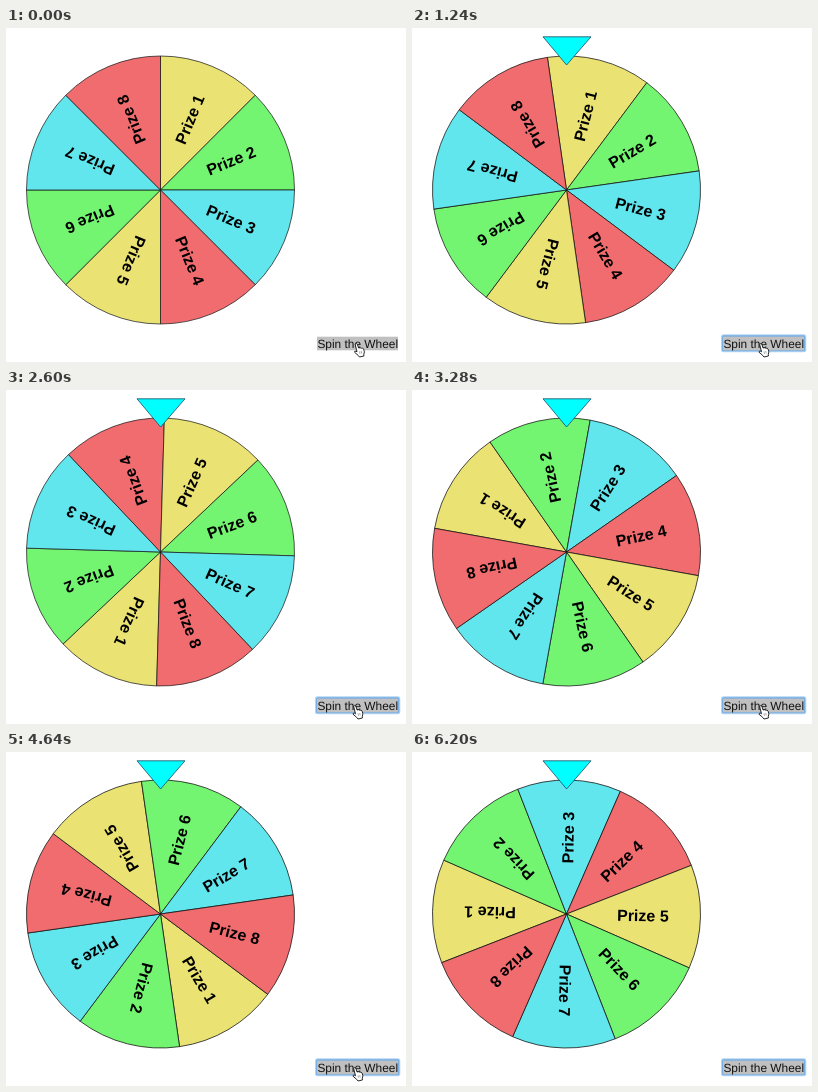
Write an HTML page that moves like this. It is 400 px wide and 334 px high and loops after 6.32 s.

```html
<!DOCTYPE html>
<html lang="en">
<head>
<meta charset="utf-8">
<title>Prize wheel</title>
<style>
  html, body { margin: 0; width: 100%; height: 100%; overflow: hidden; background: #fff; }
  svg { display: block; width: 400px; height: 334px; }
  text { font-family: "Liberation Sans", Arial, sans-serif; text-rendering: geometricPrecision; }
  #wheel path { stroke: #111; stroke-width: .7; }
  #wheel text { font-size: 16px; font-weight: bold; text-anchor: middle; }
  #label { font-size: 11.9px; fill: #111; }
</style>
</head>
<body>
<svg viewBox="0 0 400 334">
  <g id="wheel"></g>
  <path id="pointer" d="M131 8.8H179L154.6 37Z" fill="#00ffff" stroke="#1a4a66" stroke-width=".8"/>
  <g id="ring">
    <rect x="309" y="306.3" width="85.3" height="18" rx="2.5" fill="#b4d5f5"/>
    <rect x="310" y="307.3" width="83.3" height="16" rx="1.5" fill="#78b0e4"/>
  </g>
  <rect x="311" y="308.7" width="81" height="13.6" fill="#c0c0c0"/>
  <text id="label" x="311.4" y="320">Spin the Wheel</text>
  <g id="cursor">
    <path d="M347.6 316.2q1.2-1.3 2.3.2l1.2 3.6 1.5-.3 1.2.5 1.3-.1 1 1 .8 2.8-.6 2.3.1 1.8-4.4 1-1.4-1.7-3.6-3.1q-.1-1.4 1.5-1l1 .6Z"
      fill="#fff" stroke="#111" stroke-width=".9" stroke-linejoin="round"/>
    <path d="M352 323.4l.5 2.4M353.7 323l.5 2.4" stroke="#555" stroke-width=".5"/>
  </g>
</svg>
<script>
  const LOOP = 6320, STEP = 40;
  const SPIN = { start: 638.8, length: 5000, total: 8 * 360 + 248.7, power: 2.015 };
  const PRESS = 400, LEAVE = 6000;
  const CX = 154.5, CY = 162, R = 134, TEXT_R = 76.4;
  const colors = ["#eae272", "#74f572", "#62e6ee", "#f16c6f"];
  const el = id => document.getElementById(id);
  const wheel = el("wheel");

  const rim = deg => {
    const a = (deg - 90) * Math.PI / 180;
    return `${R * Math.cos(a)} ${R * Math.sin(a)}`;
  };

  const slices = [], labels = [];
  for (let i = 0; i < 8; i++) {
    const from = i * 45;
    slices.push(`<path d="M0 0L${rim(from)}A${R} ${R} 0 0 1 ${rim(from + 45)}Z" fill="${colors[i % 4]}"/>`);
    labels.push(`<text x="${TEXT_R}" y="5.6" transform="rotate(${from - 67.5})">Prize ${i + 1}</text>`);
  }
  wheel.innerHTML = slices.join("") + labels.join("");

  const show = (id, on) => el(id).setAttribute("visibility", on ? "visible" : "hidden");

  function draw(t) {
    const p = Math.min(1, Math.max(0, (t - SPIN.start) / SPIN.length));
    const angle = SPIN.total * (1 - (1 - p) ** SPIN.power);
    wheel.setAttribute("transform", `translate(${CX} ${CY}) rotate(${angle})`);
    show("pointer", t >= SPIN.start);
    show("ring", t >= PRESS);
    show("cursor", t < LEAVE);
    el("cursor").setAttribute("transform", `translate(${t < PRESS ? 1.5 : 0} 0)`);
  }

  const began = performance.now();
  function tick() {
    const t = (performance.now() - began) % LOOP;
    draw(Math.floor(t / STEP) * STEP);
    requestAnimationFrame(tick);
  }
  tick();
</script>
</body>
</html>
```
